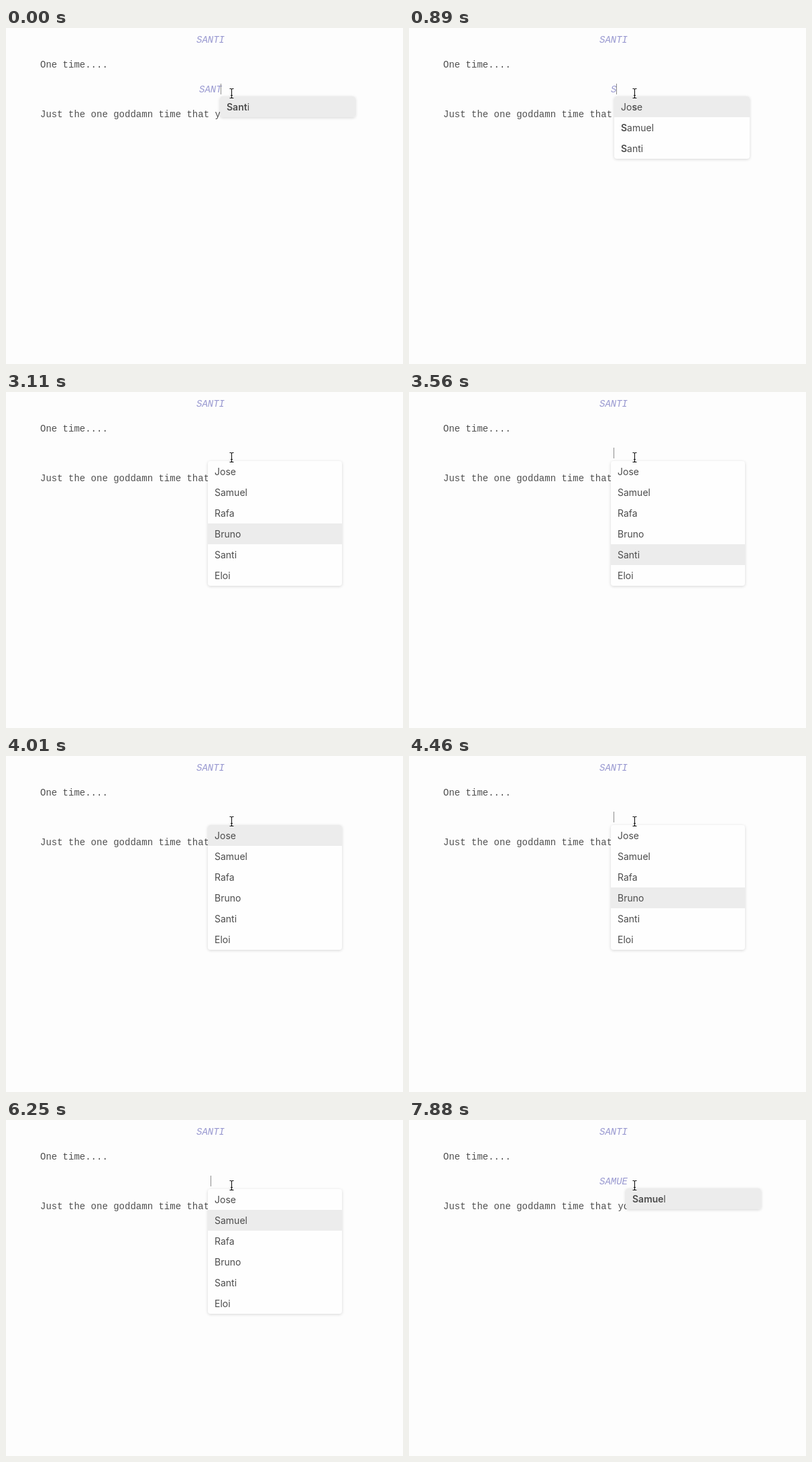
Animation, 592 px wide and 501 px high, one loop 8000 ms. Source, as an HTML page:

```html
<!DOCTYPE html>
<html lang="en">
<head>
<meta charset="utf-8">
<title>Script editor autocomplete</title>
<style>
  html, body { margin: 0; width: 100%; height: 100%; overflow: hidden; background: #fdfdfd; }
  #stage { position: relative; width: 592px; height: 501px; overflow: hidden; }
  #stage > * { position: absolute; }
  .line {
    font: 14px/16px "Liberation Mono", "Courier New", monospace;
    color: #505050; white-space: pre;
  }
  .speaker { font-style: italic; color: #9898d0; }
  #caret { top: 83px; width: 1px; height: 16px; background: #8c8c8c; }
  #menu {
    box-sizing: border-box; overflow: hidden; border-radius: 4px; background: #fefefe;
    box-shadow: 0 1px 4px rgba(0, 0, 0, .16);
    font: 14px/31px Inter, "Open Sans", sans-serif; color: #4c4c4c;
  }
  #menu div { height: 31px; padding-left: 10px; white-space: pre; }
  #menu .on { background: #ececec; }
  #menu b { font-weight: 600; }
  #pointer { left: 331px; top: 89px; }
</style>
</head>
<body>
<div id="stage">
  <div class="line speaker" style="left:284px;top:10px">SANTI</div>
  <div class="line" style="left:51px;top:47px">One time....</div>
  <div class="line speaker" id="typed" style="top:84px"></div>
  <div class="line" style="left:51px;top:121px">Just the one goddamn time that you</div>
  <div id="menu"></div>
  <div id="caret"></div>
  <svg id="pointer" width="12" height="17" fill="none">
    <path id="beam" d="M2.5 1.5H4Q5.5 1.5 5.5 3Q5.5 1.5 7 1.5H8.5M5.5 3V14M2.5 15.5H4Q5.5 15.5 5.5 14Q5.5 15.5 7 15.5H8.5M4 11.5H7" stroke="#fff" stroke-width="2.4"/>
    <use href="#beam" style="stroke:#111"/>
    <path d="M2.5 1.5H4Q5.5 1.5 5.5 3Q5.5 1.5 7 1.5H8.5M5.5 3V14M2.5 15.5H4Q5.5 15.5 5.5 14Q5.5 15.5 7 15.5H8.5M4 11.5H7" stroke="#111" stroke-width="1.1"/>
  </svg>
</div>
<script>
  const LOOP = 8000, CENTER = 305.2, HALF_CHAR = 4.2, ROW = 31;
  const names = ["Jose", "Samuel", "Rafa", "Bruno", "Santi", "Eloi"];
  const $ = id => document.getElementById(id);
  const typed = $("typed"), menu = $("menu"), caret = $("caret");

  // [start time, value]
  const typing = [[0, "SANT"], [440, "SAN"], [740, "SA"], [890, "S"], [1340, ""],
    [6690, "SAMUEL"], [7440, "SAMUE"]];
  const selection = [[0, 0], [2820, 1], [2960, 2], [3110, 3], [3260, 4], [3710, 5],
    [4010, 0], [4160, 1], [4310, 2], [4460, 3], [4750, 4], [5050, 5], [5200, 0],
    [5800, 1], [6690, 0]];
  const blink = [[0, 1], [1780, 0], [2380, 1], [2820, 0], [3560, 1], [3860, 0],
    [4460, 1], [4900, 0], [5350, 1], [5800, 0], [6250, 1], [7140, 0], [7440, 1], [7880, 0]];

  function valueAt(track, t) {
    let value;
    for (const [start, v] of track) if (start <= t) value = v;
    return value;
  }

  function label(name, query) {
    const i = name.toUpperCase().indexOf(query), end = i + query.length;
    return name.slice(0, i) + "<b>" + name.slice(i, end) + "</b>" + name.slice(end);
  }

  function drawMenu(query, selected) {
    const n = query.length;
    const rows = names.filter(name => name.toUpperCase().includes(query));
    const open = !names.some(name => name.toUpperCase() === query);
    menu.style.display = open ? "block" : "none";
    menu.style.left = (n ? Math.round(302 + HALF_CHAR * n) : 301) + "px";
    menu.style.top = (n ? 102 : 103) + "px";
    menu.style.width = (n ? 202 : 200) + "px";
    menu.style.height = rows.length * ROW + "px";
    menu.innerHTML = rows.map((name, i) =>
      `<div class="${i === selected ? "on" : ""}">${n ? label(name, query) : name}</div>`).join("");
  }

  let last = "";
  function draw(now) {
    const t = now % LOOP;
    const query = valueAt(typing, t), selected = valueAt(selection, t), lit = valueAt(blink, t);
    const key = [query, selected, lit].join();
    if (key !== last) {
      last = key;
      const n = query.length;
      typed.textContent = query;
      typed.style.left = Math.round(CENTER - HALF_CHAR * n) + "px";
      caret.style.left = Math.round(CENTER + 3.9 * n - .4) + "px";
      caret.style.visibility = lit ? "visible" : "hidden";
      drawMenu(query, selected);
    }
    requestAnimationFrame(draw);
  }
  draw(performance.now());
</script>
</body>
</html>
```
